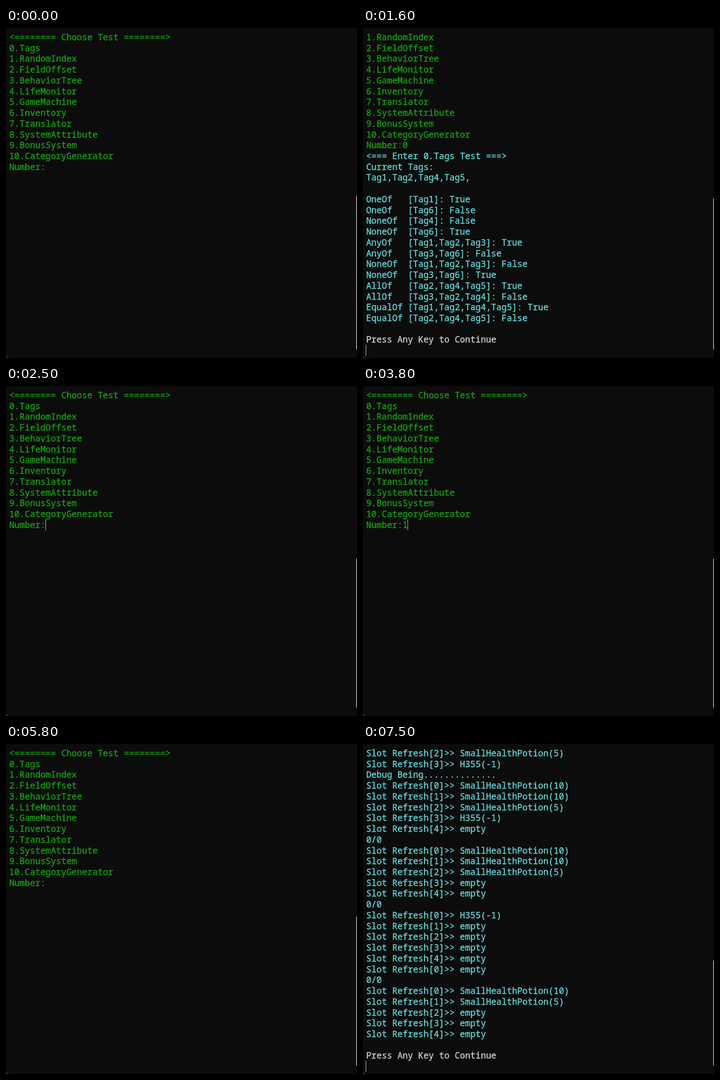
These frames come from a looping animation (772 by 725 pixels, 8 s). An HTML page:

```html
<!DOCTYPE html>
<html lang="en">
<head>
<meta charset="utf-8">
<title>Console test menu</title>
<style>
  html, body { margin: 0; height: 100%; overflow: hidden; background: #0c0c0c; }
  svg { display: block; width: 772px; height: 725px; }
  text {
    font: 19.1px "Noto Sans Mono", "DejaVu Sans Mono", monospace;
    white-space: pre;
    font-variant-ligatures: none;
    fill: currentColor;
    stroke: currentColor;
    stroke-width: .45px;
  }
  .green { color: #13a10e; }
  .cyan { color: #61d6d6; }
  .white { color: #ccc; }
</style>
</head>
<body>
<svg viewBox="0 0 772 725">
  <path d="M0 717Q0 725 8 725H0Z" fill="#444"/>
  <g id="screen"></g>
  <rect id="cursor" width="1" height="24" fill="#ccc"/>
  <rect id="track" x="764" y="7" width="16" height="715" rx="6" fill="#2c2c2c"/>
  <rect id="thumb" width="12" rx="2" fill="#9a9a9a"/>
</svg>
<script>
const LOOP = 8000, ROWS = 30, LEFT = 6.9, TOP = 8.2, CELL = 11.46, LINE = 23.73;
const byId = id => document.getElementById(id);
const screen = byId('screen'), cursor = byId('cursor'), track = byId('track'), thumb = byId('thumb');

const paint = (color, lines) => lines.map(text => ({ color, text }));
const tests = ['Tags', 'RandomIndex', 'FieldOffset', 'BehaviorTree', 'LifeMonitor', 'GameMachine',
  'Inventory', 'Translator', 'SystemAttribute', 'BonusSystem', 'CategoryGenerator'];

const menu = (input = '') => paint('green', [
  '<======== Choose Test ========>',
  ...tests.map((name, i) => `${i}.${name}`),
  'Number:' + input
]);

// The cursor waits on the empty row below the prompt.
const result = (number, lines) => [
  ...menu(number),
  ...paint('cyan', [`<=== Enter ${number}.${tests[number]} Test ===>`, ...lines]),
  ...paint('white', ['Press Any Key to Continue', ''])
];

const tagLines = [
  'Current Tags:',
  'Tag1,Tag2,Tag4,Tag5,',
  '',
  'OneOf   [Tag1]: True',
  'OneOf   [Tag6]: False',
  'NoneOf  [Tag4]: False',
  'NoneOf  [Tag6]: True',
  'AnyOf   [Tag1,Tag2,Tag3]: True',
  'AnyOf   [Tag3,Tag6]: False',
  'NoneOf  [Tag1,Tag2,Tag3]: False',
  'NoneOf  [Tag3,Tag6]: True',
  'AllOf   [Tag2,Tag4,Tag5]: True',
  'AllOf   [Tag3,Tag2,Tag4]: False',
  'EqualOf [Tag1,Tag2,Tag4,Tag5]: True',
  'EqualOf [Tag2,Tag4,Tag5]: False',
  ''
];

const randomLines = [
  'Random with 10 int numbers:',
  '0,'.repeat(10),
  '',
  'Random with a numbers array',
  'Array numbers:23,345,57,1,98,34,44,3,9,2,',
  'Random:44,57,34,23,3,2,1,98,345,9,'
];

// Each slot is its index followed by the kind of item it holds.
const items = { L: 'SmallHealthPotion(10)', S: 'SmallHealthPotion(5)', H: 'H355(-1)', e: 'empty' };
const slots = list => list.split(' ').map(([index, item]) => `Slot Refresh[${index}]>> ${items[item]}`);
const inventoryLines = [
  ...slots('2S 3H'),
  'Debug Being..............',
  ...slots('0L 1L 2S 3H 4e'), '0/0',
  ...slots('0L 1L 2S 3e 4e'), '0/0',
  ...slots('0H 1e 2e 3e 4e 0e'), '0/0',
  ...slots('0L 1S 2e 3e 4e'),
  ''
];

const screens = [
  [0, menu()],
  [1100, menu('0')],
  [1600, result('0', tagLines)],
  [2500, menu()],
  [3800, menu('1')],
  [4200, result('1', randomLines)],
  [5200, menu()],
  [7100, menu('6')],
  [7500, result('6', inventoryLines)]
].map(([time, lines]) => [time, lines.slice(-ROWS)]);

const cursorToggles = [300, 800, 1100, 2200, 2400, 3000, 3500, 4800, 5200, 5800, 6200, 6700, 7100];
const thumbTops = [[0, 368], [1600, 374], [1700, 379], [7500, 475]];
const trackOpacity = [[0, 0], [100, 1], [500, 0.4], [600, 0]];

const valueAt = (steps, t) => steps.findLast(([time]) => time <= t)[1];

function place(element, attributes) {
  for (const name in attributes) element.setAttribute(name, attributes[name]);
}

let shown;
function show(lines) {
  if (lines === shown) return;
  shown = lines;
  screen.replaceChildren(...lines.map(({ color, text }, row) => {
    const element = document.createElementNS('http://www.w3.org/2000/svg', 'text');
    place(element, { class: color, x: LEFT, y: Math.round(TOP + row * LINE + 18.8) });
    element.textContent = text;
    return element;
  }));
}

function draw(now) {
  const t = now % LOOP;
  const lines = valueAt(screens, t);
  show(lines);

  const row = lines.length - 1;
  place(cursor, {
    x: Math.floor(LEFT + lines[row].text.length * CELL),
    y: Math.round(TOP + row * LINE),
    opacity: cursorToggles.filter(time => time <= t).length % 2
  });

  const open = valueAt(trackOpacity, t), top = valueAt(thumbTops, t);
  place(track, { opacity: open });
  place(thumb, { x: 770 - 2 * open, y: top, height: 707 - top });
  requestAnimationFrame(draw);
}
draw(0);
</script>
</body>
</html>
```
